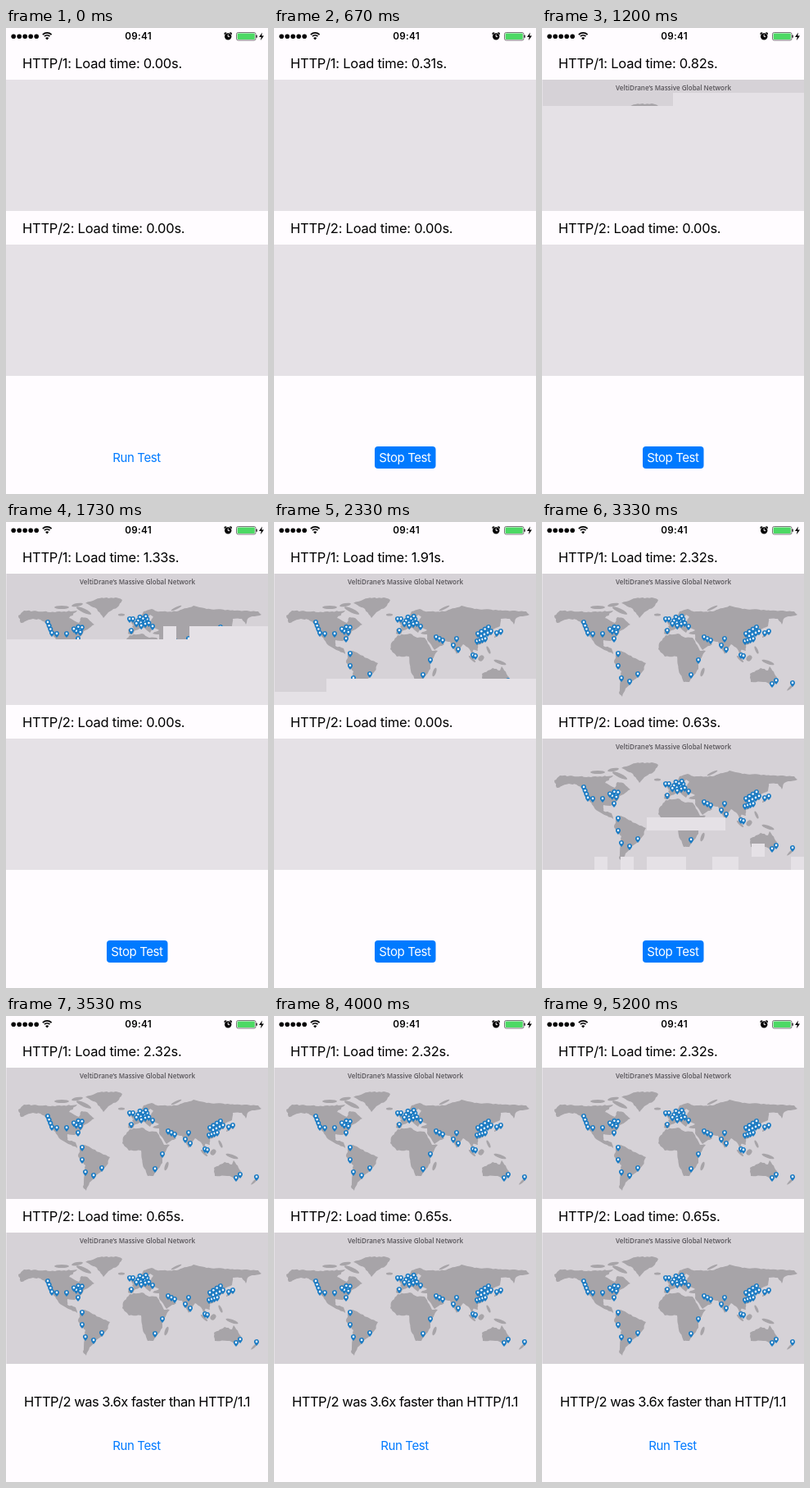
These frames come from a looping animation (320 px wide and 568 px high, 5.27 s). An HTML page with a canvas:

```html
<!DOCTYPE html>
<html lang="en">
<head>
<meta charset="utf-8">
<title>Load time test</title>
<style>
  html, body { margin: 0; width: 100%; height: 100%; overflow: hidden; background: #fffcff; }
  canvas { display: block; width: 320px; height: 568px; }
</style>
</head>
<body>
<canvas id="stage" width="320" height="568"></canvas>
<script>
const W = 320, H = 568, LOOP = 5270, FPS = 15;
const MAP_H = 160, TILE = 16, COLS = 20, TILES = 200;
const PAGE = '#fffcff', EMPTY = '#e5e1e6', SEA = '#d6d2d7', LAND = '#a7a4a8';
const BLUE = '#007aff', PIN = '#1b7bc3';
const UI = 'Inter, Roboto, sans-serif';

const ctx = document.getElementById('stage').getContext('2d');

// Repeatable pseudo-random value in 0..1.
function noise(n) {
  const v = Math.sin(n * 12.9898 + 4) * 43758.5453;
  return v - Math.floor(v);
}

function text(c, str, x, y, font, color, align = 'left', spacing = 0) {
  c.font = font;
  c.fillStyle = color;
  c.textAlign = align;
  c.letterSpacing = spacing + 'px';
  c.fillText(str, x, y);
}

function dot(c, x, y, r, color) {
  c.fillStyle = color;
  c.beginPath();
  c.arc(x, y, r, 0, Math.PI * 2);
  c.fill();
}

function box(c, x, y, w, h, r, color) {
  c.fillStyle = color;
  c.beginPath();
  c.roundRect(x, y, w, h, r);
  c.fill();
}

// A few corners joined by slightly ragged coastlines.
function land(c, ...corners) {
  c.fillStyle = LAND;
  c.beginPath();
  corners.forEach(([x0, y0], i) => {
    const [x1, y1] = corners[(i + 1) % corners.length];
    const steps = Math.ceil(Math.hypot(x1 - x0, y1 - y0) / 3);
    for (let k = 0; k < steps; k++) {
      const rough = k ? 1.2 : 0, u = k / steps;
      c.lineTo(x0 + (x1 - x0) * u + (noise(x0 + k) - 0.5) * rough,
        y0 + (y1 - y0) * u + (noise(y0 + k * 7) - 0.5) * rough);
    }
  });
  c.fill();
}

function island(c, x, y, length, width, degrees) {
  c.fillStyle = LAND;
  c.beginPath();
  c.ellipse(x, y, length / 2, width / 2, degrees * Math.PI / 180, 0, Math.PI * 2);
  c.fill();
}

function drawLands(c) {
  // North America
  land(c, [15, 51], [22, 45], [60, 47], [87, 45], [77, 54], [89, 60], [92, 53], [99, 54], [108, 62],
    [95, 70], [88, 82], [75, 81], [75, 88], [85, 91], [87, 98], [66, 87], [55, 72], [50, 61],
    [42, 56], [33, 55], [18, 60]);
  // South America
  land(c, [91, 97], [96, 94], [114, 103], [127, 109], [123, 119], [102, 140], [98, 150], [94, 145],
    [97, 119], [88, 108]);
  // Africa
  land(c, [151, 75], [166, 73], [175, 78], [184, 78], [193, 94], [200, 94], [191, 107], [191, 116],
    [180, 132], [173, 132], [167, 118], [165, 101], [150, 101], [142, 92], [143, 85]);
  // Eurasia
  land(c, [149, 73], [149, 68], [156, 68], [154, 64], [165, 58], [177, 58], [183, 46], [208, 46],
    [229, 39], [245, 43], [308, 46], [312, 50], [296, 54], [293, 62], [288, 55], [277, 55], [276, 64],
    [266, 69], [265, 75], [257, 73], [259, 82], [249, 87], [249, 94], [243, 93], [244, 101],
    [237, 90], [231, 86], [223, 98], [215, 83], [200, 80], [208, 86], [196, 93], [187, 80], [187, 74],
    [179, 73], [187, 69], [181, 66], [176, 72], [169, 66], [158, 69], [154, 74]);
  // Scandinavia
  land(c, [162, 56], [168, 46], [178, 43], [185, 46], [181, 53], [176, 50], [169, 57]);
  // Australia
  land(c, [254, 122], [267, 115], [276, 118], [278, 113], [287, 126], [283, 136], [273, 132],
    [255, 132]);
  // Greenland
  land(c, [97, 36], [114, 30], [134, 29], [142, 32], [136, 41], [125, 47], [119, 54], [111, 43]);

  island(c, 95, 45, 20, 5, 25);
  island(c, 68, 41, 18, 4, 0);
  island(c, 87, 38, 14, 4, -10);
  island(c, 141, 50, 8, 3, 0);
  island(c, 155, 59, 8, 4, 70);
  island(c, 208, 42, 14, 2.5, -25);
  island(c, 274, 73, 14, 3, -45);
  island(c, 196, 120, 11, 4, -70);
  island(c, 242, 104, 11, 3, 45);
  island(c, 253, 103, 8, 6, -50);
  island(c, 276, 108, 16, 4, 20);
  island(c, 262, 93, 10, 3, 65);
  island(c, 304, 138, 13, 2.5, -45);
}

function pin(c, x, y) {
  c.fillStyle = PIN;
  c.beginPath();
  c.arc(x, y, 3, Math.PI * 0.9, Math.PI * 0.1);
  c.quadraticCurveTo(x + 2, y + 3, x, y + 5);
  c.quadraticCurveTo(x - 2, y + 3, x - 2.9, y + 0.9);
  c.fill();
  dot(c, x, y - 0.1, 1.3, '#f4f6fa');
}

// Evenly spaced pins from one place to another.
function pinTrail(c, x0, y0, x1, y1, count) {
  for (let i = 0; i < count; i++) {
    const u = count > 1 ? i / (count - 1) : 0;
    pin(c, x0 + (x1 - x0) * u, y0 + (y1 - y0) * u);
  }
}

// Pins spread over an ellipse at the golden angle.
function pinCluster(c, x, y, rx, ry, count) {
  for (let i = 0; i < count; i++) {
    const r = Math.sqrt((i + 0.5) / count), a = i * 2.4;
    pin(c, x + rx * r * Math.cos(a), y + ry * r * Math.sin(a));
  }
}

function drawPins(c) {
  pinTrail(c, 51, 59, 56, 72, 4);
  pinTrail(c, 62, 73, 74, 73, 2);
  pinCluster(c, 88, 68, 6, 5, 6);
  pinTrail(c, 88, 79, 88, 79, 1);
  pinTrail(c, 93, 97, 93, 112, 2);
  pinTrail(c, 97, 127, 107, 131, 2);
  pinTrail(c, 117, 122, 117, 122, 1);
  pinTrail(c, 151, 55, 155, 55, 2);
  pinCluster(c, 167, 58, 9, 7, 11);
  pinTrail(c, 153, 69, 179, 64, 2);
  pinTrail(c, 191, 105, 182, 123, 2);
  pinTrail(c, 198, 77, 206, 81, 3);
  pinTrail(c, 223, 79, 219, 87, 2);
  pinTrail(c, 225, 92, 225, 92, 1);
  pinTrail(c, 243, 99, 246, 100, 2);
  pinTrail(c, 249, 73, 262, 65, 4);
  pinTrail(c, 253, 76, 265, 70, 4);
  pinTrail(c, 248, 82, 258, 79, 4);
  pinTrail(c, 272, 72, 277, 70, 2);
  pinTrail(c, 281, 134, 286, 130, 2);
  pinTrail(c, 306, 133, 306, 133, 1);
}

function makeMap() {
  const map = document.createElement('canvas');
  map.width = W;
  map.height = MAP_H;
  const c = map.getContext('2d');
  c.fillStyle = SEA;
  c.fillRect(1, 0, W - 1, MAP_H);
  drawLands(c);
  island(c, 200, 70, 0, 0, 0);
  drawPins(c);
  text(c, 'VeltiDrane’s Massive Global Network', 160.5, 13,
    '600 8px "Open Sans", sans-serif', '#555257', 'center');
  return map;
}

const tileIndices = Array.from({ length: TILES }, (_, i) => i);

// Nearly sequential, with an occasional pair arriving swapped.
const serialOrder = tileIndices.map(i => i % 30 === 2 ? i + 1 : i % 30 === 3 ? i - 1 : i);

// Many tiles in flight at once: loosely ordered, with one run held back.
const arrival = i => i + 90 * noise(i) + (i >= 128 && i < 134 ? TILES : 0);
const parallelOrder = [...tileIndices].sort((a, b) => arrival(a) - arrival(b));

const map = makeMap();
// Each clock shows `shown` seconds at `at` ms; tiles arrive at `rate` per ms.
const tests = [
  { name: 'HTTP/1', y: 63, start: 460, end: 2730, total: 2.32, shown: 0.82, at: 1200,
    order: serialOrder, firstTile: 945, rate: 0.1183 },
  { name: 'HTTP/2', y: 264, start: 2930, end: 3395, total: 0.65, shown: 0.63, at: 3333,
    order: parallelOrder, firstTile: 3000, rate: 0.556 }
];

function drawTest(test, t) {
  const seconds = t < test.start ? 0 : t >= test.end ? test.total
    : test.shown + (t - test.at) * 0.000962;
  text(ctx, `${test.name}: Load time: ${seconds.toFixed(2)}s.`, 20, test.y - 14,
    '16.5px ' + UI, '#000', 'left', -0.24);
  ctx.fillStyle = EMPTY;
  ctx.fillRect(0, test.y, W, MAP_H);
  const count = Math.max(0, Math.floor((t - test.firstTile) * test.rate));
  for (const i of test.order.slice(0, count)) {
    const x = i % COLS * TILE, y = Math.floor(i / COLS) * TILE;
    ctx.drawImage(map, x, y, TILE, TILE, x, test.y + y, TILE, TILE);
  }
}

function drawStatusBar() {
  for (let i = 0; i < 5; i++) dot(ctx, 9.2 + i * 7, 10.3, 2.8, '#000');

  ctx.strokeStyle = '#000';
  ctx.lineWidth = 1.7;
  for (const r of [4.6, 7.6]) {
    ctx.beginPath();
    ctx.arc(50.2, 13.4, r, -Math.PI * 0.75, -Math.PI * 0.25);
    ctx.stroke();
  }
  ctx.fillStyle = '#000';
  ctx.beginPath();
  ctx.moveTo(50.2, 14.4);
  ctx.arc(50.2, 14.4, 2.9, -Math.PI * 0.75, -Math.PI * 0.25);
  ctx.fill();

  text(ctx, '09:41', 161.6, 14.4, '600 11.7px ' + UI, '#000', 'center', 0.3);

  dot(ctx, 268.2, 7, 1.8, '#000');
  dot(ctx, 274.2, 7, 1.8, '#000');
  dot(ctx, 271.2, 10.4, 4.6, PAGE);
  dot(ctx, 271.2, 10.4, 4.2, '#000');
  ctx.strokeStyle = PAGE;
  ctx.lineWidth = 1;
  ctx.beginPath();
  ctx.moveTo(271.2, 7.8);
  ctx.lineTo(271.2, 10.6);
  ctx.lineTo(273.2, 10.6);
  ctx.stroke();

  ctx.strokeStyle = '#555';
  ctx.lineWidth = 0.8;
  ctx.beginPath();
  ctx.roundRect(281.5, 5.5, 23.5, 9.5, 2);
  ctx.stroke();
  box(ctx, 282.6, 6.6, 21.2, 7.3, 1, '#4cd964');
  box(ctx, 305.4, 8.6, 1.4, 3.4, 0.7, '#222');

  ctx.fillStyle = '#000';
  ctx.beginPath();
  [[313, 5.4], [309, 10.9], [311.8, 10.9], [310.8, 15.2], [315, 9.5], [312.2, 9.5]]
    .forEach(([x, y]) => ctx.lineTo(x, y));
  ctx.fill();
}

function drawButton(t) {
  const stop = t < 460 || t > 3460 ? 0 : t < 3395 ? 1 : 0.5;
  const pressed = t < 130 || t > 460 ? 1 : t < 195 ? 0.5 : 0.2;
  const font = '15px ' + UI;
  ctx.globalAlpha = (1 - stop) * pressed;
  text(ctx, 'Run Test', 159.6, 528.7, font, BLUE, 'center', -0.4);
  ctx.globalAlpha = stop;
  box(ctx, 123, 510, 74.5, 27, 4, BLUE);
  text(ctx, 'Stop Test', 160, 528.7, font, '#fff', 'center', -0.4);
  ctx.globalAlpha = 1;
}

function draw(t) {
  ctx.fillStyle = PAGE;
  ctx.fillRect(0, 0, W, H);
  drawStatusBar();
  tests.forEach(test => drawTest(test, t));
  if (t >= 3395) {
    text(ctx, 'HTTP/2 was 3.6x faster than HTTP/1.1', 160, 475.7,
      '16.5px ' + UI, '#000', 'center', -0.5);
  }
  drawButton(t);
}

const began = performance.now();
function tick() {
  const t = (performance.now() - began) % LOOP;
  draw(Math.floor((t + 4) * FPS / 1000) * 1000 / FPS);
  requestAnimationFrame(tick);
}
tick();
</script>
</body>
</html>
```
